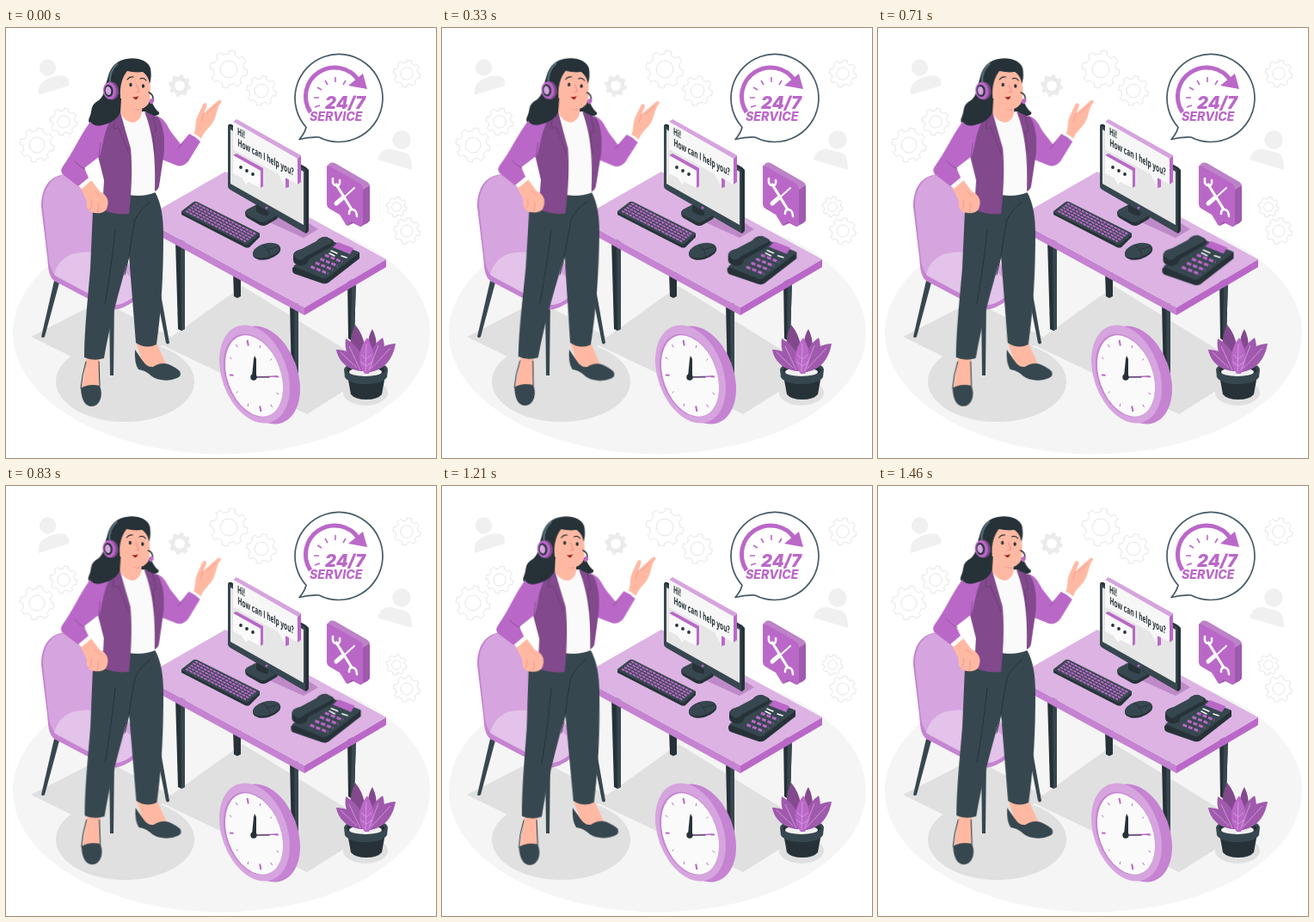
Animation of 500 by 500 pixels, one loop 1.5 s. Source, as an HTML page:

```html
<!DOCTYPE html>
<html lang="en">
<head>
<meta charset="utf-8">
<title>24/7 service</title>
<style>
html, body { margin: 0; width: 100%; height: 100%; overflow: hidden; background: #fff; }
svg { display: block; width: 100vw; height: 100vh; }
.p { fill: #ba68c8; }
.pm { fill: #c583d1; }
.pd { fill: #82498c; }
.pl { fill: #d6a4de; }
.k { fill: #263238; }
.g { fill: #37474f; }
.w { fill: #fafafa; }
.skin { fill: #ffb9a3; }
.line { fill: none; stroke: #263238; stroke-linecap: round; stroke-linejoin: round; }
.purple { fill: none; stroke: #ba68c8; }
.white { fill: none; stroke: #fafafa; stroke-linecap: round; }
.gear { fill: none; stroke: #e6e6e6; stroke-width: 1; stroke-linejoin: round; }
.solid { fill: #ebebeb; fill-rule: evenodd; stroke: none; }
.badge { font: italic 900 20px Inter, Roboto, sans-serif; }
.badge .small { font-size: 14.2px; font-weight: 800; }
.talk { font: 700 12px "Open Sans", "Noto Sans", sans-serif; }
.woman { transform-origin: 158px 238px; animation: sway 1.5s linear infinite; }
.phone { transform-origin: 372px 270px; animation: heartbeat 1.5s linear infinite; }
@keyframes sway {
  25% { transform: rotate(1deg); }
  75% { transform: rotate(-1deg); }
}
@keyframes heartbeat {
  14%, 42% { transform: scale(1.08); }
  28%, 70%, 100% { transform: scale(1); }
}
</style>
</head>
<body>
<svg viewBox="0 0 500 500">
  <ellipse cx="250.500" cy="354.500" rx="242.500" ry="141" fill="#f5f5f5"/>

  <g fill="#f0f0f0">
    <circle cx="48.500" cy="46" r="9.700"/>
    <path d="M38 78v-6c0-7 6-11 13-14s19-5 22 3v6z"/>
    <circle cx="460" cy="130" r="10.700"/>
    <path d="M432 153c2-8 8-13 16-12l16 4c6 2 8 8 8 20z"/>
  </g>
  <g id="gears"></g>

  <g fill="#e0e0e0">
    <path d="M29 359l82-42 84 44-72 44z"/>
    <path d="M180 368l95-68 142 88-5 22-62 39z"/>
    <ellipse cx="138.500" cy="411" rx="80.500" ry="47"/>
    <ellipse cx="418" cy="424" rx="26" ry="15"/>
  </g>

  <g id="chair">
    <path class="g" d="M56 294l6 2-17 63q-2 2-4 0zM173 300l5-2 12 68q-2 3-4 0zM120 314h6l-1 90h-4z"/>
    <path class="pm" d="M41 208c0-22 9-37 30-38 20 0 34 10 38 30l44 98c3 12-2 20-13 25-9 5-17 6-25 2l-59-31c-7-6-7-17-8-28z"/>
    <path class="pl" d="M43 207c0-21 10-36 30-37 18 0 32 10 36 30l43 96c3 10-2 17-12 22-9 5-17 5-25 1l-55-29c-8-5-10-17-11-28z"/>
    <path d="M56 287q4-17 20-24 16-5 38 0l38 33c3 9-2 17-12 22-9 5-17 5-25 1z" fill="#e3c3e9"/>
  </g>

  <g id="desk">
    <path class="k" d="M197 246h11v104l-4 2-4-2zM264 284h9v28l-4 2-4-2zM330 320h10v88h-8zM397 292h10l-2 69-4 2-3-2z"/>
    <path class="g" d="M203 248h5v102l-4 2zM335 322h5v86h-4zM402 292h5l-2 69-4 2z"/>
    <path class="pm" d="M159 222l188 103v9L159 231z"/>
    <path class="p" d="M347 325l95-56v9l-95 56z"/>
    <path d="M159 222l96-55 187 102-95 56z" fill="#dcb3e3"/>
    <path d="M302 224l12-6 27 15 11-6 11 7-17 10z" fill="#bd8ac7"/>
  </g>

  <g id="monitor">
    <path class="k" d="M278 216q0-3 4-5l12-7h18v12q6 2 3 6l-12 7q-4 2-8 0l-14-8q-3-2-3-5z"/>
    <path class="g" d="M278 215q0-3 4-5l14-7 16 9q6 3 3 6l-12 7q-4 2-8 0l-14-7q-3-1-3-3z"/>
    <path class="k" d="M291 198l14 7v13q-7 1-14-5z"/>
    <path class="k" d="M258 115q0-4 4-3l87 50 3 3v71l-3 3-88-51q-3-2-3-5z"/>
    <path class="g" d="M258 115q1-2 4 0l84 48q2 1 2 4v71l-87-50q-3-2-3-5z"/>
    <path d="M261 118l85 49v62l-85-48z" fill="#e6e6e6"/>
    <circle class="p" cx="303" cy="209" r="1.500"/>
    <path class="p" d="M339 152l4-4v31l-4 3zM325 174l4 2v9l-4 1z"/>
    <path class="pl" d="M264 109l4-3 75 42-4 4z"/>
    <path d="M264 109l75 43v30l-14-8v12l-8-16-53-29z" fill="#f7f7f7"/>
    <g class="talk k">
      <text transform="matrix(.55 .295 0 1 269 124)">Hi!</text>
      <text transform="matrix(.55 .295 0 1 269.500 137)">How can I help you?</text>
    </g>
    <path class="p" d="M264 148l4-2 31 17v21l-3 2v-20z"/>
    <path class="w" d="M264 148l32 18v20l-14-7-3 3-5-8-10-5z"/>
    <g class="k"><circle cx="273" cy="162" r="1.900"/><circle cx="280" cy="166" r="1.900"/><circle cx="287" cy="170" r="1.900"/></g>
  </g>

  <g id="keyboard">
    <path class="k" d="M204 213v4l74 38q3 1 5 0l12-12v-4z"/>
    <path class="g" d="M204 213l13-10q2-2 5-1l72 36q2 1 0 3l-12 10q-2 2-5 0l-72-36z"/>
    <path class="purple" stroke-width="2" stroke-dasharray="3.700 1" d="M220 204l71 36M217.300 206.200l71 36M214.600 208.400l71 36M211.900 210.600l71 36M209.200 212.800l70 35.500"/>
  </g>

  <g id="mouse" transform="rotate(-15 303 259.500)">
    <ellipse class="k" cx="303" cy="260" rx="16.500" ry="9"/>
    <ellipse class="g" cx="303" cy="258.500" rx="16" ry="8"/>
    <path class="line" stroke-width=".8" d="M300 251q7 7 5 15M303 258l15 0"/>
  </g>

  <g class="phone">
    <path class="k" d="M333 279l41-30 37 12v7l-36 28q-3 2-7 1l-32-11q-3-1-3-5z"/>
    <path class="g" d="M334 277l41-31 34 14q2 1 0 3l-35 27q-3 2-6 1z"/>
    <path class="k" d="M334 270v-5q0-4 4-6l6-2 17-9 3-3q5-3 9-2l6 3q3 2 2 5l-4 4-25 14-2 5q-4 3-9 2l-5-2q-2-2-2-4z"/>
    <path class="g" d="M334 264q2-5 10-7l17-9q4-5 11-5l7 4q1 3-5 5l-26 14q-4 5-9 3z"/>
    <path class="p" d="M386 249l18 7-4 7-20-8z"/>
    <path class="white" stroke-width="1.500" d="M378 259l7 3M390 265l6 2M376 262l6 3"/>
    <path class="purple" stroke-width="3" stroke-dasharray="5 2" d="M371 264l20 8M365.500 268.500l20 8M360 273l20 8M354.500 277.500l20 8"/>
  </g>

  <g id="badge">
    <path d="M349 115.500A51 51 0 1 1 364 127Q352 126.500 341 129.500 347 123 349 115.500z" fill="#fff" stroke="#455a64" stroke-width="1.700" stroke-linejoin="round"/>
    <path class="purple" stroke-width="5" d="M354 98A32.500 32.500 0 0 1 410 61"/>
    <path class="p" d="M398 67l17-14 5 18z"/>
    <path class="purple" stroke-width="1.600" d="M383 57v6M371 61l3 5M362 69l5 3M358 81h6M359 92l6-2M395 61l-3 5"/>
    <g class="badge p">
      <text x="371" y="94">24/7</text>
      <text class="small" x="353" y="108">SERVICE</text>
    </g>
  </g>

  <g id="tools">
    <path d="M373 161l4-4q2-1 5 0l38 22q3 2 3 6v39l-3 3-8 4-8-4-7 3z" fill="#a05aad"/>
    <path class="pl" d="M373 161l4-4q2-1 5 0l38 22 3 4-8 5z" opacity=".55"/>
    <path class="p" d="M373 162q0-3 4-1l35 20q3 2 3 6v41q0 4-4 2l-9-5-6 5-8-13-12-7q-3-2-3-5z"/>
    <path class="white" stroke-width="3.200" d="M384 182l18 29"/>
    <path class="white" stroke-width="2.600" d="M380 175q-1 8 4 8 5 1 4-6M399 216q0-6 4-5 5 1 5 8"/>
    <path class="white" stroke-width="2" d="M405 186l-11 10"/>
    <path class="white" stroke-width="5" d="M391 198l-7 6"/>
  </g>

  <g id="clock">
    <ellipse class="pm" cx="301" cy="403.500" rx="38" ry="59" transform="rotate(-20 301 403.500)"/>
    <ellipse class="pl" cx="289" cy="402.500" rx="38" ry="59" transform="rotate(-20 289 402.500)"/>
    <ellipse class="pm" cx="287.500" cy="404" rx="32" ry="50" transform="rotate(-20 287.500 404)"/>
    <ellipse class="w" cx="288.500" cy="404.500" rx="31" ry="49" transform="rotate(-20 288.500 404.500)"/>
    <g id="ticks" class="purple"></g>
    <path class="purple" stroke-width="1.500" d="M288 406l27-1"/>
    <path class="line" stroke-width="1.200" d="M288 406l18 0"/>
    <path class="k" d="M286 405l2-20 1-4 2 4v20z"/>
    <circle class="k" cx="288" cy="406" r="3.700"/>
  </g>

  <g id="plant">
    <path class="k" d="M397 404h44l-4 22q-5 6-18 6t-18-6z"/>
    <path class="g" d="M393 397q2-8 26-8t25 8l-1 9q-6 8-25 8t-24-8z"/>
    <ellipse class="k" cx="418.500" cy="398" rx="22" ry="7"/>
    <ellipse cx="418" cy="400" rx="19" ry="5" fill="#f0f0f0"/>
    <path d="M409 396c-7-15-13-29-3-51 12 14 14 33 10 51zM420 395c-1-19 0-36 6-45 8 15 5 32 0 46z" fill="#82498c"/>
    <path d="M412 399c-16-2-26-13-28-25 14 0 26 8 31 25zM421 400c5-23 15-32 32-33-3 18-13 30-29 33zM413 399c-15-12-20-23-18-38 14 8 22 20 23 38zM420 400c0-19 6-32 18-40 5 15 0 30-13 40z" fill="#a05aad"/>
    <path class="p" d="M417 402c-9-12-8-28 3-42 9 14 10 31 2 42z"/>
    <path fill="none" stroke="#d6a4de" stroke-width=".8" d="M418 400l1-33M412 398l-13-28M422 398l11-29M408 395l-19-18M425 396l22-24M413 380l6 5 6-5M412 388l7 5 7-5"/>
  </g>

  <g class="woman">
    <path class="k" d="M122 52c-9 12-4 24-14 32-11 6-7 12-11 20-4 8 6 12 13 10l30 1 24-14c9 2 15 1 14-3-7-5-7-13-14-18z"/>

    <path class="skin" d="M94 382l15 2-1 33-7 7-13-4zM151 365l24 1 10 22 4 9-16 7-14-15z"/>
    <path class="g" d="M87 419q9-6 22-3 3 8 1 15-3 9-11 9-11-1-12-21z"/>
    <path class="line" stroke-width="1" d="M93 388q-5 16-6 31M108 388l1 28"/>
    <path class="g" d="M150 374q4 6 9 13 5 8 12 7 9-6 18-3 9 4 13 8 3 5-3 8-9 4-19 2-8-1-14-7-5-4-12-5-5-7-4-23z"/>
    <path class="g" d="M101 212l44-21 28-1c8 14 10 32 10 50 0 44-2 86-8 128q-12 6-24-2l-8-101c-11 39-22 77-29 119q-12 4-23-1c0-30 4-67 7-103z"/>
    <path class="line" stroke-width="1" d="M168 202q-11 7-18 21-4 20-7 42l-5 22M127 235q-4 40-12 86"/>

    <path class="skin" d="M218 124c4-8 1-14 5-22l6-13c2-3 6-2 4 3l-3 7 16-14c4-3 6 0 3 3-4 6-4 13-8 21-4 7-11 11-14 20z"/>
    <path fill="none" stroke="#f28f8f" stroke-width=".7" d="M230 99l-3 10M245 89l-12 11"/>
    <path class="w" d="M214 122q7 0 14 8l-4 5-12-9z"/>
    <path class="p" d="M174 102c10 2 13 11 18 19l11 14 10-12q7 3 13 9l-14 23q-6 7-13 5l-20-8-6-28z"/>
    <path class="line" style="stroke:#82498c" stroke-width=".8" d="M205 134l-5 6M183 125v22"/>

    <path class="w" d="M128 99l34-2 12 12v82q-15 6-31 3z"/>
    <path class="skin" d="M133 78l25 10v11q-2 9-10 11-10-1-15-11z"/>
    <path d="M139 86q6 10 17 10v-6z" fill="#f28f8f" opacity=".7"/>
    <path class="pd" d="M131 98l-21 9-3 42 7 28-2 34q14 7 31 5 5-44 2-76-6-20-12-42zM161 97l16 7c7 10 8 28 6 46l-5 34q-1 4-5 6c1-36-1-64-12-93z"/>
    <path class="line" style="stroke:#6b3a74" stroke-width=".8" d="M127 100l-2 17 6-1 12 30M171 102l4 18-4 1 2 24"/>

    <path class="skin" d="M84 181l13-7 12 16c8 4 11 10 9 17-1 7-7 9-15 8-8-1-10-7-9-14z"/>
    <path fill="none" stroke="#f28f8f" stroke-width=".8" d="M97 212q4-5 2-12M106 214q3-5 1-11M103 190l7 6"/>
    <path class="w" d="M82 181l14-9 5 4-13 11z"/>
    <path class="p" d="M128 100c-13 1-24 3-30 9-11 15-21 37-32 52q-4 6 1 10l17 13 12-10-5-11 18-14c5-14 4-35 19-49z"/>
    <path class="line" style="stroke:#82498c" stroke-width=".8" d="M92 164q-7-3-12-9M108 150l2-16"/>
    <path class="k" d="M120 78c-2 14-16 12-20 21-6 9 1 17 12 14 9-2 18-7 21-15l1-16z"/>

    <path class="skin" d="M134 52c9-8 24-8 30-2 4 12 5 25 3 35-3 9-13 11-20 9-8-4-14-11-15-20z"/>
    <path class="k" d="M119 78c-4-18 1-34 14-40 14-6 32-2 35 9 1 6 1 12-1 18-1-7-4-11-8-14-7 1-13 0-18-1-5 6-7 13-8 21l-1 18z"/>
    <g class="line" stroke-width="1.200">
      <path d="M141 60q3-4 7-3M156 59q4-2 7 2"/>
      <path d="M152 66l3 8-4 1" style="stroke:#f28f8f"/>
    </g>
    <ellipse class="k" cx="145" cy="66" rx="1.600" ry="2.200"/>
    <ellipse class="k" cx="159.500" cy="67.500" rx="1.600" ry="2.200"/>
    <path d="M147 80q4 1 7-1-1 5-4 4z" fill="#a02724"/>
    <path fill="none" stroke="#546e7a" stroke-width="2.200" d="M121 65q-2-14 9-24"/>
    <ellipse class="pd" cx="123" cy="73" rx="8" ry="10.500" transform="rotate(-8 123 73)"/>
    <ellipse class="p" cx="120.500" cy="73" rx="7.500" ry="10" transform="rotate(-8 120.500 73)"/>
    <ellipse class="k" cx="119.500" cy="73" rx="5" ry="7" transform="rotate(-8 119.500 73)"/>
    <ellipse class="pl" cx="119" cy="73" rx="3.300" ry="5" transform="rotate(-8 119 73)"/>
    <path class="line" stroke-width="1.500" d="M166 75q6 2 5 10"/>
    <ellipse class="p" cx="169.500" cy="85" rx="2.400" ry="3.300" transform="rotate(25 169.500 85)"/>
  </g>
</svg>
<script>
const NS = "http://www.w3.org/2000/svg";
const add = (id, d, cls = "") => {
  const path = document.createElementNS(NS, "path");
  path.setAttribute("d", d);
  path.setAttribute("class", cls);
  document.getElementById(id).append(path);
  return path;
};

const ring = (x, y, r) => `M${x - r} ${y}a${r} ${r} 0 1 0 ${2 * r} 0a${r} ${r} 0 1 0 ${-2 * r} 0z`;

function gear(x, y, r, solid) {
  const teeth = 8, pts = [];
  for (let i = 0; i < teeth; i++) {
    for (const [off, k] of [[-.27, .82], [-.2, 1], [.2, 1], [.27, .82]]) {
      const a = (i + off) / teeth * 2 * Math.PI + .2;
      pts.push(`${(x + r * k * Math.cos(a)).toFixed(1)} ${(y + r * k * Math.sin(a)).toFixed(1)}`);
    }
  }
  add("gears", `M${pts.join("L")}z` + ring(x, y, r * .45), solid ? "solid" : "gear");
}

[[259, 48, 22], [297, 73, 17.5], [67, 109, 16], [36, 136, 20], [466, 53, 16],
 [454, 208, 12], [466, 236, 15.5]].forEach(g => gear(...g));
gear(202, 67, 13, true);

// Clock ticks on the tilted dial
const tilt = -20 * Math.PI / 180;
const dial = (a, k) => {
  const u = 31 * k * Math.cos(a), v = 49 * k * Math.sin(a);
  return `${288.5 + u * Math.cos(tilt) - v * Math.sin(tilt)} ${404.5 + u * Math.sin(tilt) + v * Math.cos(tilt)}`;
};
for (let i = 0; i < 12; i++) {
  const a = i * Math.PI / 6 + .25, major = i % 3 === 0;
  add("ticks", `M${dial(a, .88)}L${dial(a, major ? .74 : .8)}`).setAttribute("stroke-width", major ? 2 : 1);
}
</script>
</body>
</html>
```
